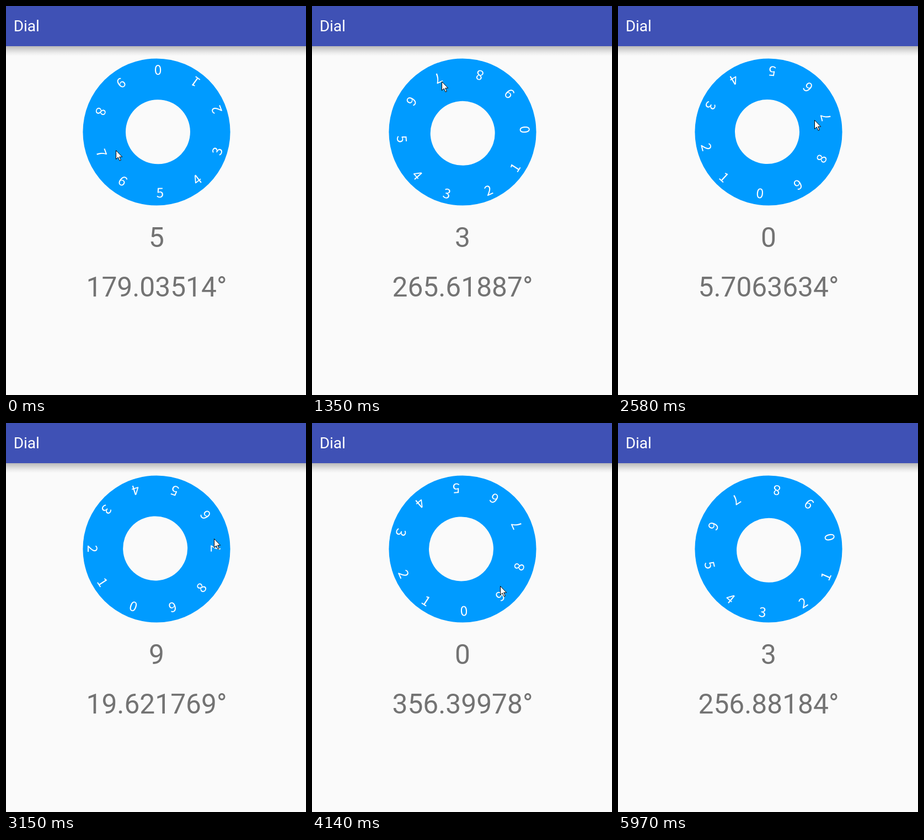
An HTML page for the animation above (6780 ms loop, 544 by 707 pixels).

```html
<!DOCTYPE html>
<html lang="en">
<head>
<meta charset="utf-8">
<title>Dial</title>
<style>
  html, body { margin: 0; width: 100%; height: 100%; overflow: hidden; background: #fafafa; }
  svg { display: block; width: 544px; height: 707px; }
  text { font-family: Roboto, sans-serif; }
  .read { font-size: 49.7px; fill: #737373; text-anchor: middle; }
  #digits text { font: 24.5px "Noto Sans CJK JP", "Noto Sans CJK SC", "Noto Sans", sans-serif; fill: #fff; text-anchor: middle; }
</style>
</head>
<body>
<svg viewBox="0 0 544 707">
  <defs>
    <linearGradient id="shade" x2="0" y2="1">
      <stop offset="0" stop-opacity=".26"/>
      <stop offset=".35" stop-opacity=".15"/>
      <stop offset=".7" stop-opacity=".05"/>
      <stop offset="1" stop-opacity="0"/>
    </linearGradient>
  </defs>
  <rect y="73" width="544" height="18" fill="url(#shade)"/>
  <rect width="544" height="73" fill="#3f51b5"/>
  <text x="13.7" y="46" font-size="28" fill="#fff">Dial</text>

  <circle cx="273" cy="229" r="133.6" fill="#009bff"/>
  <g id="dial">
    <circle cx="2.5" r="58.5" fill="#fafafa"/>
    <g id="digits" transform="translate(4.5 -1)"></g>
  </g>

  <text id="digit" class="read" x="273" y="438"></text>
  <text id="angle" class="read" x="273" y="528"></text>
  <path id="cursor" d="M.5 .5V16.5L4.2 13L7 19.2L9.4 18.2L6.7 12.2H11.7Z" fill="#fff" stroke="#000"/>
</svg>
<script>
const $ = id => document.getElementById(id);
const CX = 273, CY = 228.8, LOOP = 6780, STEP = 138;

// Turning points of the drag: ms, dial angle, cursor x, cursor y
const keys = [
  [0, 179.03514, 199, 262],
  [690, 204.46004, 157, 220],
  [2040, 357.35712, 343, 207],
  [3150, 379.621769, 377, 210],
  [4140, 356.39978, 341, 296],
  [4890, 278.02054, 366, 224],
  [5550, 256.88184, 394, 293],
  [5970, 256.88184, 274, 842]
];
const END = keys[keys.length - 1][0];

for (let i = 0; i < 10; i++) {
  // Ten equal sectors, lettered slightly unevenly
  const bearing = 36 * i + 1.9 * Math.sin(0.8 * Math.PI * i);
  const t = document.createElementNS('http://www.w3.org/2000/svg', 'text');
  t.textContent = i;
  t.setAttribute('y', 9);
  t.setAttribute('transform', `rotate(${bearing}) translate(0 -111.4) rotate(180)`);
  $('digits').append(t);
}

const mix = (a, b, u) => a + (b - a) * u;
const polar = (x, y) => [Math.atan2(y - CY, x - CX), Math.hypot(x - CX, y - CY)];

function poseAt(ms) {
  const t = Math.min(ms, END);
  let i = 0;
  while (i < keys.length - 2 && t >= keys[i + 1][0]) i++;
  const [t0, a0, x0, y0] = keys[i], [t1, a1, x1, y1] = keys[i + 1];
  const n = Math.round((t1 - t0) / STEP);
  const u = Math.floor((t - t0) / (t1 - t0) * n) / n;

  // The cursor sweeps around the hub by the shorter way
  const [p0, r0] = polar(x0, y0), [p1, r1] = polar(x1, y1);
  const sweep = Math.atan2(Math.sin(p1 - p0), Math.cos(p1 - p0));
  const p = p0 + sweep * u, r = mix(r0, r1, u);
  return {
    angle: mix(a0, a1, u) % 360,
    x: Math.round(CX + r * Math.cos(p)),
    y: Math.round(CY + r * Math.sin(p))
  };
}

function draw(ms) {
  const { angle, x, y } = poseAt(ms);
  $('dial').setAttribute('transform', `translate(${CX} ${CY}) rotate(${angle - 180})`);
  $('digit').textContent = (10 - Math.round(angle / 36)) % 10;
  $('angle').textContent = angle.toPrecision(8) + '°';
  $('cursor').setAttribute('transform', `translate(${x} ${y})`);
  $('cursor').style.display = ms < END ? '' : 'none';
}

const start = performance.now();
function frame() {
  draw((performance.now() - start) % LOOP);
  requestAnimationFrame(frame);
}
frame();
</script>
</body>
</html>
```
